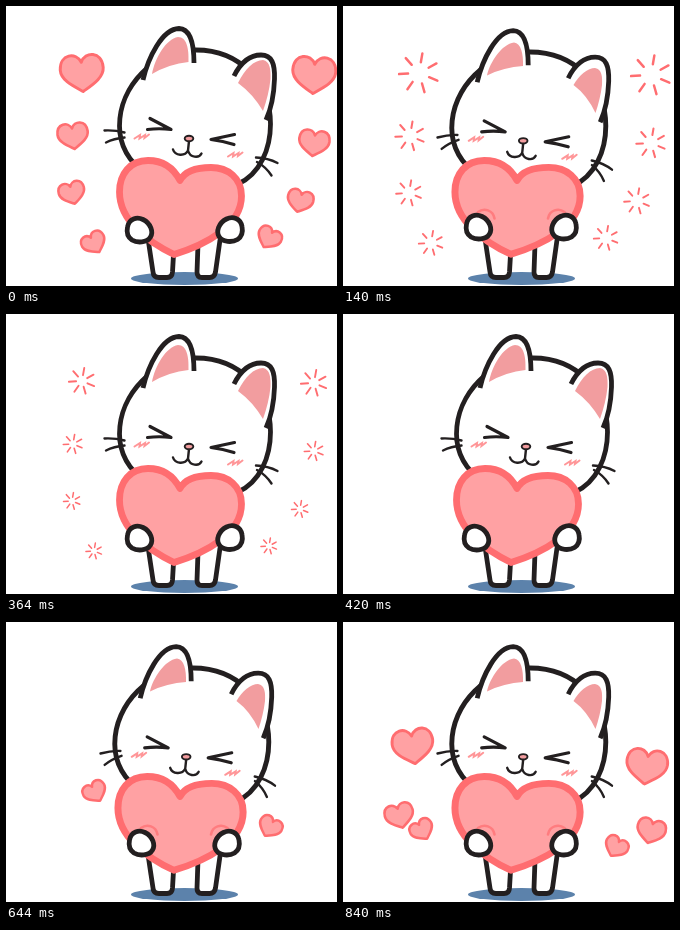
Write an HTML page that moves like this. It is 331 by 280 pixels and loops after 980 ms.

```html
<!DOCTYPE html>
<html lang="en">
<head>
<meta charset="utf-8">
<title>Kitten with a heart</title>
<style>
  html, body { margin: 0; width: 100%; height: 100%; overflow: hidden; background: #fff; }
  svg { display: block; width: 100%; height: 100%; }

  .ink { fill: #fff; stroke: #231f20; stroke-width: 4.8; stroke-linecap: round; stroke-linejoin: round; }
  .ear { stroke-linecap: butt; }
  .thin { fill: none; stroke-width: 2.4; }
  .eye { fill: none; stroke-width: 3.2; }
  .ear-in { fill: #f29d9f; }
  .blush { fill: none; stroke: #ff9698; stroke-width: 2; stroke-linecap: round; }
  .heart { fill: #ffa1a3; stroke: #ff6d70; stroke-linejoin: round; }
  .spark { fill: none; stroke: #ff6d70; stroke-linecap: round; }
  .dent { fill: none; stroke: #ff7c7f; stroke-width: 2.6; stroke-linecap: round; }

  .up { animation: up 980ms step-end infinite; }
  .down { animation: down 980ms step-end infinite; }
  .slot { visibility: hidden; animation: slot 980ms step-end infinite; }

  @keyframes up {
    0%, 28.5714%, 71.4285% { visibility: visible; }
    14.2857%, 57.1428%, 85.7142%, 100% { visibility: hidden; }
  }
  @keyframes down {
    0%, 28.5714%, 71.4285% { visibility: hidden; }
    14.2857%, 57.1428%, 85.7142%, 100% { visibility: visible; }
  }
  @keyframes slot {
    0% { visibility: visible; }
    14.2857%, 100% { visibility: hidden; }
  }
</style>
</head>
<body>
<svg viewBox="0 0 331 280">
  <defs>
    <path id="head" class="ink" d="M190 44C235 44 264.500 78 264.500 118C264.500 143 254 168 232 178Q185 192 140 168C122 155 113.500 140 113.500 120C113.500 80 148 44 190 44Z"/>
    <g id="ears" class="ink ear">
      <path d="M137 74C142 52 156 23 173 22.500C186 23 188 41 188 57"/>
      <path d="M228 70C234 58 243 49 255 49C266 49 269 58 268.500 73C268 88 265 103 260 114"/>
    </g>
    <g id="face">
      <path class="ink eye" d="M144 112.500L165 123.500Q153 122 141.500 123.500M228.500 128.500L205 133.500Q217 135 228 138.500"/>
      <path class="ink thin" d="M167 143.500C169 150 179 150.500 182 144.500C184 152 193 152.500 195.500 147.500M183 135L182 144.500"/>
      <ellipse cx="183" cy="132.500" rx="4.300" ry="2.700" fill="#f29d9f" stroke="#231f20" stroke-width="1.900"/>
      <path id="blush" class="blush" d="M128.500 132.500L134 129L133.500 132.500L139 129L138.500 132L143 128.500"/>
      <use href="#blush" x="93.500" y="18"/>
    </g>
    <path id="whiskers-l" class="ink thin" d="M98.500 124.500Q109 124 118.500 126.500M100 136.500Q108 132.500 118.500 131.500"/>
    <path id="whiskers-r" class="ink thin" d="M250 151.500Q262 152 271.500 157M251 156Q260 161 265.500 169.500"/>
    <path id="big" class="heart" stroke-width="6.800" d="M174 174.500C166 159 153 154.500 142 154.500C124 154.500 113.500 168 113.500 186C113.500 215 142 236 168 248.500C200 238.500 235.500 220 235.500 190C235.500 172 222 161.500 205 161.500C190 161.500 179 165 174 174.500Z"/>
    <path id="paw" class="ink" d="M121.500 221C123 212.500 131 210.500 137 213.500C145 217.500 147.500 226 144.500 231C141 237 131 237 126 234C121.500 231 120.500 226 121.500 221Z"/>
    <g id="hug">
      <path class="dent" d="M135 206C141 201.500 150 204 151.500 212.500"/>
      <use href="#paw" x="2" y="-3"/>
    </g>
  </defs>

  <ellipse cx="178.500" cy="272.500" rx="53.500" ry="6.500" fill="#5c82ab"/>
  <path class="ink" d="M142.500 236L147 266Q147.500 271.500 153 271.500H161Q166 271.500 166.500 266L168 240M192 238L191 266Q191 271.500 196 271.500H203.500Q208.500 271.500 209.500 266L214 234"/>

  <g class="up">
    <use href="#head"/>
    <use href="#ears"/>
    <path class="ear-in" d="M146 68C149 52 160 33 172 31C181 31 183 43 182.500 56Q163 58 146 68Z"/>
    <path class="ear-in" d="M232 77C239 63 248 54 257 54C264 55 265 64 264.500 73Q263 88 257 105Q247 88 232 77Z"/>
    <use href="#whiskers-l"/>
    <use href="#whiskers-r"/>
    <use href="#face"/>
    <use href="#big"/>
    <use href="#paw"/>
    <use href="#paw" transform="translate(357.500 -.5) scale(-1 1)"/>
  </g>

  <g class="down">
    <use href="#head" transform="translate(-7 2) scale(1.020 1)"/>
    <use href="#ears" transform="translate(-2.800 2.200)"/>
    <path class="ear-in" d="M144 69.500C147 56 159 38 171 36.500C178 37 180.500 48 180 60Q161 61 144 69.500Z"/>
    <path class="ear-in" d="M230.500 79C236 69 245 62 252 62C259 63 259.500 71 259 79Q257.500 92 252.500 107Q244 89 230.500 79Z"/>
    <use href="#whiskers-l" transform="translate(-3.500 2.500) rotate(-13 118 129)"/>
    <use href="#whiskers-r" transform="translate(-1.500 3) rotate(10 250 153)"/>
    <use href="#face" transform="translate(-2.800 2.300)"/>
    <use href="#big" transform="translate(-4.500 .3) scale(1.026 .998)"/>
    <use href="#hug"/>
    <use href="#hug" transform="translate(356.500 0) scale(-1 1)"/>
  </g>

  <g id="fx"></g>
</svg>
<script>
  const fx = document.getElementById('fx');
  const STEP = 140, COUNT = 7, BIRTH = 4, RAYS = 7;
  const HEART = 'M0-.25C-.1-.5-.49-.48-.5-.1C-.5 .14-.22 .29 0 .43C.22 .29 .5 .14 .5-.1C.49-.48 .1-.5 0-.25Z';

  // Start and end of each flight, in order of birth
  const left = ['89,170 76,67', '96,215 67,130', '79,208 66,187', '88,237 88,237'];
  const right = ['264,205 308,69', '258,233 308,137', '273,225 294,195', '263,232 263,232'];

  const mix = (a, b, t) => a + (b - a) * t;
  const easeOut = t => 1 - (1 - t) ** 2;
  const endWidth = i => 26 + 20 * 0.35 ** i;

  function add(parent, tag, attrs) {
    const el = document.createElementNS('http://www.w3.org/2000/svg', tag);
    for (const key in attrs) el.setAttribute(key, attrs[key]);
    return parent.appendChild(el);
  }

  // One group per step of the loop, shown only during that step
  const slots = Array.from({ length: COUNT }, (_, i) =>
    add(fx, 'g', { class: 'slot', style: `animation-delay:${(i - COUNT) * STEP}ms` }));

  function heart(slot, x, y, width, tilt) {
    const line = 1.8 + width / 40, size = width - line;
    add(slot, 'path', {
      class: 'heart', d: HEART, 'stroke-width': line / size,
      transform: `translate(${x} ${y}) rotate(${tilt}) scale(${size})`
    });
  }

  function burst(slot, x, y, radius, inner) {
    let d = '';
    for (let k = 0; k < RAYS; k++) {
      const a = k / RAYS * 2 * Math.PI - 1.4, c = Math.cos(a), s = Math.sin(a);
      const from = radius * inner;
      d += `M${x + c * from} ${y + s * from}L${x + c * radius} ${y + s * radius}`;
    }
    add(slot, 'path', { class: 'spark', d, 'stroke-width': 0.8 + radius / 12 });
  }

  // Hearts rise on a bowed path, growing and straightening up, then burst
  function fly(points, i, side) {
    const [x0, y0, x1, y1] = points.split(/[ ,]/).map(Number);
    const life = COUNT - BIRTH - i;
    for (let age = 0; age <= life; age++) {
      const t = life ? age / life : 1;
      const bow = side * (12 + 13 * i) * Math.sin(Math.PI * t);
      heart(slots[(BIRTH + i + age) % COUNT],
        mix(x0, x1, t) + bow, mix(y0, y1, t * t),
        mix(26, endWidth(i), easeOut(t)), side * 30 * 0.5 ** age);
    }
    const radius = 1.5 + 0.4 * endWidth(i);
    burst(slots[1], x1, y1, radius, 0.55);
    burst(slots[2], x1, y1, radius * 0.66, 0.45);
  }

  left.forEach((points, i) => fly(points, i, -1));
  right.forEach((points, i) => fly(points, i, 1));
</script>
</body>
</html>
```
